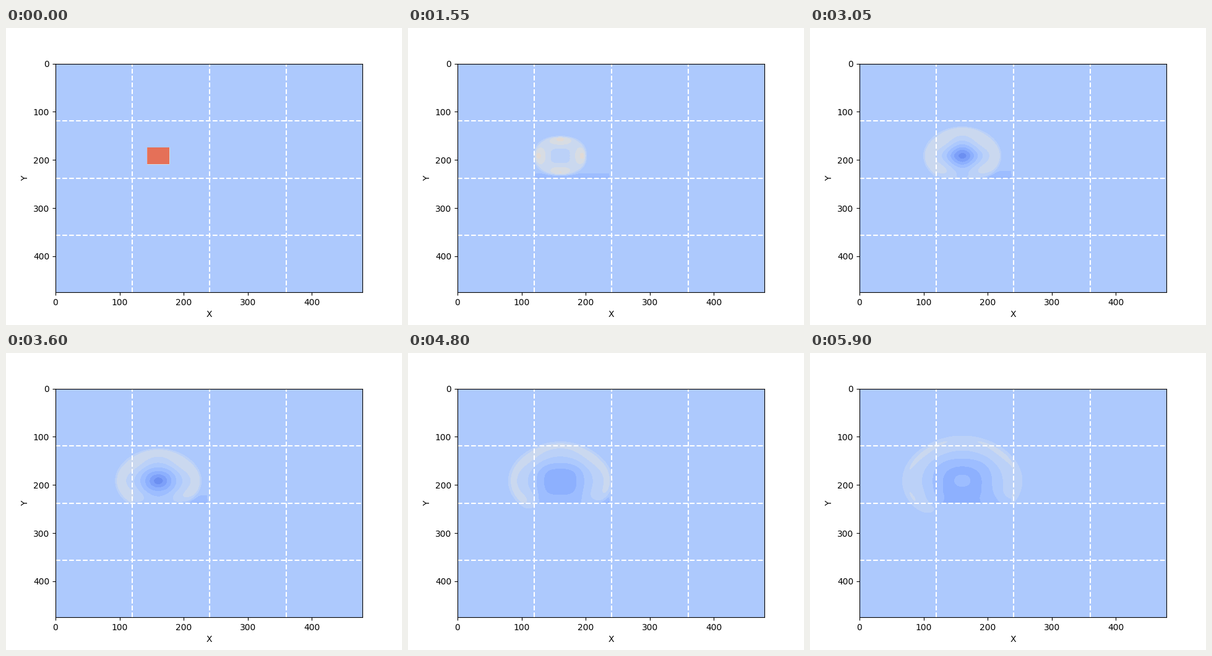
A matplotlib script for the animation above (5950 ms loop, 640x480 px).

```python
import numpy as np
import matplotlib.pyplot as plt
from matplotlib.animation import FuncAnimation

NX, NY = 480, 476            # whole grid, split in 4 x 4 blocks
BX, BY = NX // 4, NY // 4
X0, X1, Y0, Y1 = 30, 290, 70, 290   # window that the waves can reach
FRAMES, INTERVAL = 119, 50
G, SUBSTEPS = 9.81, 3
DT = 0.15 / SUBSTEPS
BANDS, H_MAX = 22, 3.0

xs, ys = np.arange(X0, X1), np.arange(Y0, Y1)
X, Y = np.meshgrid(xs, ys)


def divergence(h, a, b):
    """Rusanov flux differences along the last axis; a is the normal momentum."""
    u = a / h
    q = np.array([h, a, b])
    f = np.array([a, a * u + 0.5 * G * h * h, b * u])
    s = np.abs(u) + np.sqrt(G * h)
    s = np.maximum(s[:, 1:], s[:, :-1])
    face = 0.5 * (f[..., 1:] + f[..., :-1] - s * (q[..., 1:] - q[..., :-1]))
    out = np.zeros_like(q)
    out[..., 1:-1] = face[..., 1:] - face[..., :-1]
    return out


def simulate():
    """Shallow water: a square column collapses; one block stays at rest."""
    column = (np.abs(X - 160.5) < 17) & (np.abs(Y - 191.5) < 17)
    frozen = (X >= BX) & (X < 2 * BX) & (Y >= 2 * BY) & (Y < 3 * BY)
    h = np.where(column, 2.5, 1.0)
    mx, my = np.zeros_like(h), np.zeros_like(h)
    heights = [h.copy()]
    for _ in range(FRAMES - 1):
        for _ in range(SUBSTEPS):
            dh, dx, dy = divergence(h, mx, my)
            eh, ey, ex = (d.T for d in divergence(h.T, my.T, mx.T))
            h = h - DT * (dh + eh)
            mx = mx - DT * (dx + ex)
            my = my - DT * (dy + ey)
            h[frozen], mx[frozen], my[frozen] = 1.0, 0.0, 0.0
        heights.append(h.copy())
    return heights


def erfc(z):
    """Complementary error function for z >= 0."""
    t = 1 / (1 + 0.47047 * z)
    return t * (0.3480242 - 0.0958798 * t + 0.7478556 * t * t) * np.exp(-z * z)


def leak(n):
    """Loss that seeps up from the faulty block edge."""
    if n == 0:
        return 0.0
    depth = np.maximum(2 * BY - Y, 0)
    inside = (X > BX) & (X < 2 * BX - 2) & (Y < 2 * BY) & (Y >= BY)
    return np.where(inside, 0.23 * erfc(depth / (2 * np.sqrt(1.22 * n))), 0.0)


heights = simulate()
levels = np.linspace(0, H_MAX, BANDS + 1)
cmap = plt.get_cmap("coolwarm")
rest = (np.searchsorted(levels, 1.0) - 0.5) / BANDS

fig, ax = plt.subplots(figsize=(6.4, 4.8), dpi=100)
ax.set_facecolor(cmap(rest))
ax.set_xlim(0, NX - 1)
ax.set_ylim(NY - 1, 0)
ax.set_xlabel("X")
ax.set_ylabel("Y")
for k in (1, 2, 3):
    ax.axvline(k * BX, color="white", linestyle="--")
    ax.axhline(k * BY, color="white", linestyle="--")

shown = []


def update(n):
    while shown:
        shown.pop().remove()
    shown.append(ax.contourf(xs, ys, heights[n] - leak(n), levels=levels,
                             cmap=cmap, vmin=0, vmax=H_MAX))
    return shown


anim = FuncAnimation(fig, update, frames=FRAMES, interval=INTERVAL,
                     repeat=True, repeat_delay=0, blit=False)
plt.show()
```
